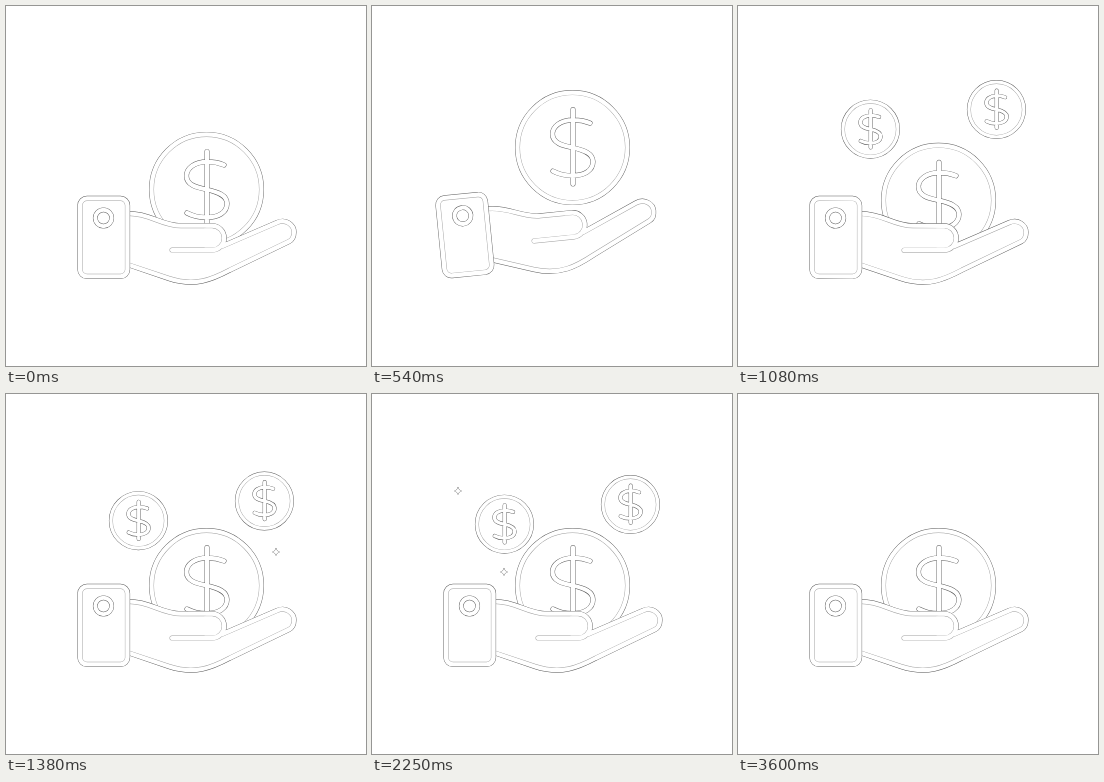
An HTML page with a canvas that plays this animation: 360x360 px, repeating every 3660 ms.

```html
<!DOCTYPE html>
<html lang="en">
<head>
<meta charset="utf-8">
<title>Hand and coins</title>
<style>
  html, body { margin: 0; width: 100%; height: 100%; overflow: hidden; background: #fff; }
  canvas { display: block; width: 360px; height: 360px; }
</style>
</head>
<body>
<canvas id="stage"></canvas>
<script>
const SIZE = 360, LOOP = 3660, LEAD = 60;
const EDGE = '#5c5c5c', RIM = 0.8;
const canvas = document.getElementById('stage');
const ctx = canvas.getContext('2d');
const dpr = window.devicePixelRatio || 1;
canvas.width = canvas.height = SIZE * dpr;

const path = d => new Path2D(d);
const circle = (x, y, r) => {
  const p = new Path2D();
  p.arc(x, y, r, 0, Math.PI * 2);
  return p;
};

const disc = circle(0, 0, 55);
const dollar = path('M17.5-24.5Q10-27.6 1-27.6C-13-27.6-20-20.5-20-13.5' +
  'C-20-4.5-10-2 0 0C12 2.6 20.5 6 20.5 14C20.5 23 12 28 0 28' +
  'C-9 28-15 26-19.5 23.5M.5-38V36.5');
const palm = path('M123 207.5C145 207.5 155 219.7 175 219.7H206L212 242L271 216.5' +
  'C280 212.5 288 219 288 226C288 231 286 234 283 235.5L224 264' +
  'C206 273.5 189 281 163 272.5L123 259Z');
const fingers = path('M123 207.5C145 207.5 155 219.7 175 219.7H206' +
  'A12.2 12.2 0 0 1 206 244.1H166' +
  'M216 240.3L271 216.5C280 212.5 288 219 288 226C288 231 286 234 283 235.5L224 264' +
  'C206 273.5 189 281 163 272.5L123 259');
const thumb = circle(206, 231.9, 12.2);
const cuff = new Path2D();
cuff.roundRect(74, 192.4, 47.5, 78, 7);
const button = circle(97.5, 212, 8.2);
const star = path('M0-10Q1.3-1.3 10 0Q1.3 1.3 0 10Q-1.3 1.3-10 0Q-1.3-1.3 0-10Z');

// Rows of [time, value]; time 0 is the moment the big coin takes off.
const TRACKS = {
  coinY: [[0, 191.5], [345, 84.3], [870, 203.5], [910, 203.5], [1250, 191.5]],
  tilt: [[60, 0], [330, -15], [800, 0], [900, 0.8], [1180, 0]],
  drop: [[900, 75], [1130, -7], [1750, 0], [3200, 0], [3550, 70]],
  size: [[900, 0], [1100, 1], [3200, 1], [3550, 0]]
};
const SMALL = [[132.4, 130.2], [258.4, 110.5]];
const STARS = [[270, 158, 1370], [86, 97, 2240], [132, 178, 2240]];
const STAR_TIME = 630;

function at(track, t) {
  const i = track.findIndex(k => k[0] > t);
  if (i === 0) return track[0][1];
  if (i < 0) return track[track.length - 1][1];
  const [t0, a] = track[i - 1], [t1, b] = track[i];
  const e = (1 - Math.cos(Math.PI * (t - t0) / (t1 - t0))) / 2;
  return a + (b - a) * e;
}

function stroke(line, color, width) {
  ctx.strokeStyle = color;
  ctx.lineWidth = width;
  ctx.stroke(line);
}

function fill(shapes, color) {
  ctx.fillStyle = color;
  shapes.forEach(p => ctx.fill(p));
}

// White line with a thin rim, softer on the inner side of filled shapes.
function outline(line, width, shapes = [], rim = RIM) {
  fill(shapes, '#fff');
  stroke(line, EDGE, width + rim);
  fill(shapes, 'rgba(255,255,255,.4)');
  stroke(line, '#fff', width);
}

function placed(x, y, scale, draw) {
  ctx.save();
  ctx.translate(x, y);
  ctx.scale(scale, scale);
  draw();
  ctx.restore();
}

function drawCoin(x, y, scale, width, rim) {
  if (scale < 0.02) return;
  placed(x, y, scale, () => {
    outline(disc, width, [disc], rim);
    outline(dollar, width, [], rim);
  });
}

function drawHand(tilt) {
  ctx.save();
  ctx.translate(72, 279);
  ctx.rotate(tilt * Math.PI / 180);
  ctx.translate(-72, -279);
  outline(fingers, 4.2, [palm, thumb]);
  outline(cuff, 4.4, [cuff]);
  outline(button, 4);
  ctx.restore();
}

function drawStar(x, y, age) {
  if (age <= 0 || age >= STAR_TIME) return;
  const s = Math.sin(Math.PI * age / STAR_TIME);
  placed(x, y, s, () => {
    stroke(star, EDGE, 0.6 / s);
    fill([star], '#fff');
  });
}

function render(ms) {
  const t = (ms + LEAD) % LOOP;
  ctx.setTransform(dpr, 0, 0, dpr, 0, 0);
  ctx.fillStyle = '#fff';
  ctx.fillRect(0, 0, SIZE, SIZE);
  ctx.lineCap = ctx.lineJoin = 'round';

  const drop = at(TRACKS.drop, t), size = at(TRACKS.size, t);
  SMALL.forEach(([x, y]) => drawCoin(x, y + drop, 0.5 * size, 6.4, RIM * 2));
  drawCoin(200.5, at(TRACKS.coinY, t), 1, 4.2, RIM);
  drawHand(at(TRACKS.tilt, t));
  STARS.forEach(([x, y, start]) => drawStar(x, y, t - start));
}

const begin = performance.now();
function tick() {
  render(performance.now() - begin);
  requestAnimationFrame(tick);
}
tick();
</script>
</body>
</html>
```
